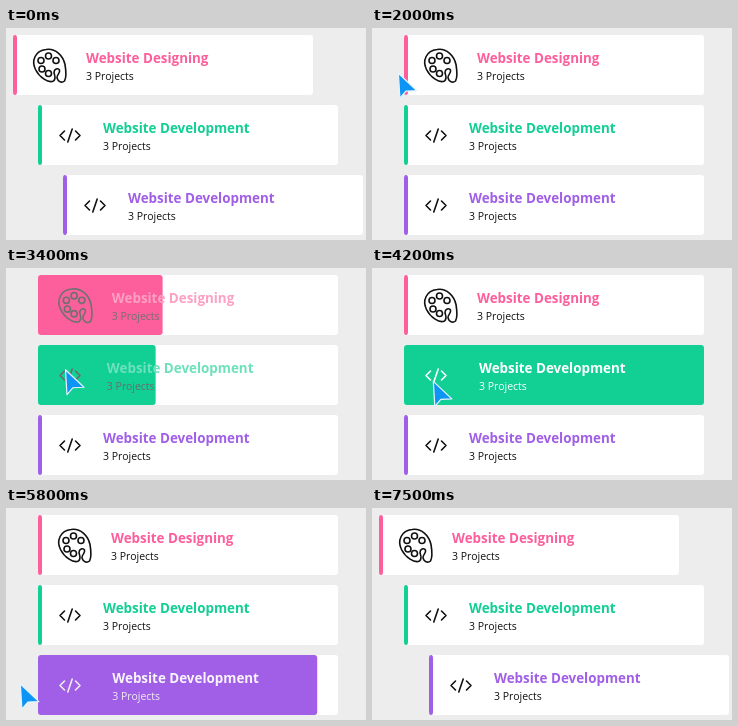
Recreate the animation shown at these times as an HTML page. Size 360 by 212 pixels, loop 7.7 s.

```html
<!DOCTYPE html>
<html lang="en">
<head>
<meta charset="utf-8">
<title>Project cards</title>
<style>
  html, body { margin: 0; height: 100%; overflow: hidden; background: #ededed; }
  svg { display: block; width: 360px; height: 212px; }
  text { font-family: "Open Sans", "Noto Sans", sans-serif; }
  .title { font-size: 13.4px; font-weight: 700; }
  .sub { font-size: 10.5px; }
  .icon { fill: none; stroke-width: 1.6; stroke-linecap: round; stroke-linejoin: round; }
</style>
</head>
<body>
<svg id="stage" viewBox="0 0 360 212">
  <defs>
    <g id="palette">
      <path d="M-3.5 -16C6 -17.5 13.5 -10 15.5 -1C16.5 5 17 12 15 15.5C12 18 8.500 16 7.500 12.500C7 9 11 8 10 4.500C8.500 2 4.500 3.500 4.500 7C5 10 7 13 4 15.500C-1 18 -10 12 -14 4C-18.500 -5 -14 -15 -3.500 -16Z"/>
      <circle cx="-8.500" cy="-5" r="3"/>
      <circle cx="-1" cy="-9.500" r="3"/>
      <circle cx="6.500" cy="-5" r="3"/>
      <circle cx="-7.500" cy="3.500" r="3"/>
      <circle cx="-1" cy="8" r="3"/>
    </g>
    <path id="code" d="M-5.500 -4.500L-10 0L-5.500 4.500M5.500 -4.500L10 0L5.500 4.500M2.200 -6.500L-2.200 6.500"/>
  </defs>
  <g id="cards"></g>
  <path id="cursor" d="M0 0L1.500 25L7.500 18L18.500 17.500Z" fill="#0d95f5" stroke="#e6f4ff" stroke-width="1.200" stroke-linejoin="round"/>
</svg>
<script>
const LOOP = 7700, GROW = 500;
const WHITE = [255, 255, 255], BLACK = [16, 16, 16];

// textX and iconX: resting and hovered positions; hover: enter and leave times
const cards = [
  { title: 'Website Designing', icon: 'palette', color: [252, 95, 155], y: 7, shift: -25,
    textX: [73, 75], iconX: [36.5, 38], zoom: 0.07, hover: [2020, 3120] },
  { title: 'Website Development', icon: 'code', color: [18, 207, 147], y: 77, shift: 0,
    textX: [65, 75], iconX: [32, 32], zoom: 0, hover: [3190, 4400] },
  { title: 'Website Development', icon: 'code', color: [160, 95, 230], y: 147, shift: 25,
    textX: [65, 75], iconX: [32, 32], zoom: 0, hover: [4465, 5720] }
];

// time, x, y
const cursorPath = [
  [1600, -22, 60], [2250, 50, 38], [2750, 50, 38], [3600, 61, 112],
  [4150, 61, 112], [4700, 74, 170], [5400, 74, 170], [6100, -24, 180]
];

const ease = (t, from, to) => {
  const p = Math.min(1, Math.max(0, (t - from) / (to - from)));
  return p * p * (3 - 2 * p);
};
const lerp = (a, b, p) => a + (b - a) * p;
const mix = (a, b, p) => `rgb(${a.map((v, i) => Math.round(lerp(v, b[i], p)))})`;
const set = (el, attrs) => {
  for (const key in attrs) el.setAttribute(key, attrs[key]);
};

const cardLayer = document.getElementById('cards');
const cursor = document.getElementById('cursor');

for (const card of cards) {
  const g = document.createElementNS('http://www.w3.org/2000/svg', 'g');
  g.innerHTML = `<rect width="300" height="60" rx="3" fill="#fff"/>
    <rect height="60" rx="3" fill="${mix(card.color, WHITE, 0)}"/>
    <use class="icon" href="#${card.icon}"/>
    <text class="title" y="28">${card.title}</text>
    <text class="sub" y="45">3 Projects</text>`;
  cardLayer.append(g);
  card.parts = [g, ...g.children];
}

function drawCard(card, t, spread) {
  const [g, , fill, icon, title, sub] = card.parts;
  const [enter, leave] = card.hover;
  const h = ease(t, enter, enter + GROW) - ease(t, leave, leave + GROW);
  const x = lerp(...card.textX, h);
  set(g, { transform: `translate(${32 + card.shift * spread} ${card.y})` });
  set(fill, { width: lerp(4, 300, h) });
  set(icon, {
    transform: `translate(${lerp(...card.iconX, h)} 30.500) scale(${1 + card.zoom * h})`,
    stroke: mix(BLACK, WHITE, h)
  });
  set(title, { x, fill: mix(card.color, WHITE, h) });
  set(sub, { x, fill: mix(BLACK, WHITE, h) });
}

function drawCursor(t) {
  let [, x, y] = cursorPath[0];
  for (let i = 1; i < cursorPath.length; i++) {
    const [t0, x0, y0] = cursorPath[i - 1], [t1, x1, y1] = cursorPath[i];
    const p = ease(t, t0, t1);
    x += (x1 - x0) * p;
    y += (y1 - y0) * p;
  }
  set(cursor, { transform: `translate(${x} ${y})` });
}

function frame() {
  const t = performance.now() % LOOP;
  const spread = 1 - ease(t, 0, 800) + ease(t, 6800, 7500);
  cards.forEach(card => drawCard(card, t, spread));
  drawCursor(t);
  requestAnimationFrame(frame);
}
frame();
</script>
</body>
</html>
```
